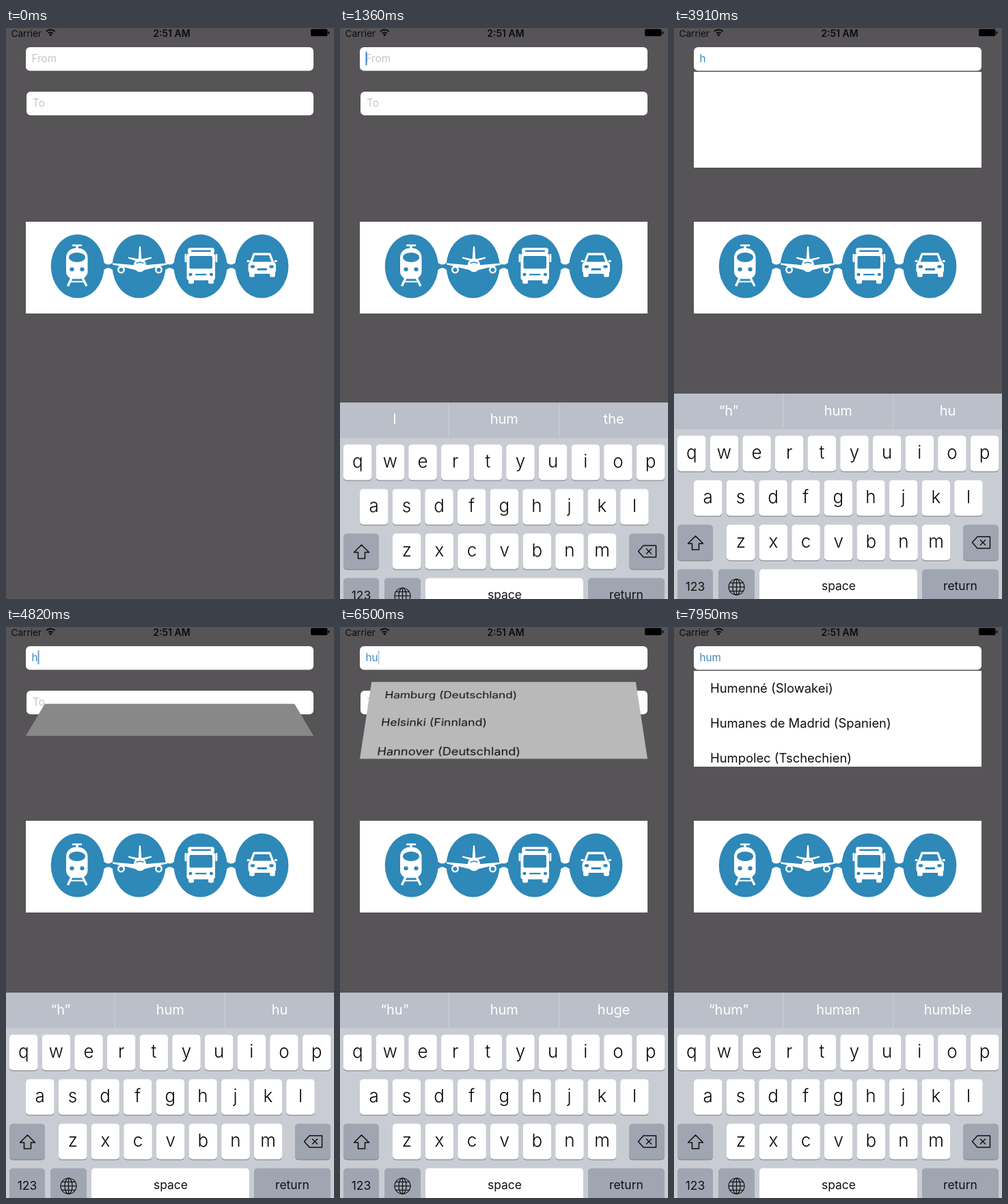
An HTML page with a canvas for the animation above (8 s loop, 480 by 834 pixels).

```html
<!DOCTYPE html>
<html lang="en">
<head>
<meta charset="utf-8">
<title>City search</title>
<style>
  html, body { margin: 0; width: 100%; height: 100%; overflow: hidden; background: #565457; }
  canvas { position: absolute; left: 0; top: 0; }
  #space { position: absolute; left: 29px; top: 64px; width: 421px; height: 140px; perspective: 860px; }
  #panel { position: relative; width: 100%; height: 100%; overflow: hidden; background: #fff; }
  #panel div { height: 51px; padding-left: 24px; white-space: nowrap;
    font: 18.4px/51px Inter, "Open Sans", sans-serif; color: #111; }
  #panel #shade { position: absolute; inset: 0; height: auto; padding: 0; background: #000; }
</style>
</head>
<body>
<canvas id="stage" width="480" height="834"></canvas>
<div id="space"><div id="panel"><div></div><div></div><div></div><div id="shade"></div></div></div>
<script>
const LOOP = 8000, FOCUS = 1090, FLIP_MS = 500;
const KEYS_Y = 534, KEYS_H = 300;
const FONT = 'Inter, "Open Sans", sans-serif';
const BLUE = '#2e88b8', WHITE = '#fff';

const typing = [
  { at: FOCUS, text: '', hints: ['I', 'hum', 'the'] },
  { at: 2300, text: 'h', hints: ['“h”', 'hum', 'hu'] },
  { at: 5530, text: 'hu', hints: ['“hu”', 'hum', 'huge'] },
  { at: 7000, text: 'hum', hints: ['“hum”', 'human', 'humble'] }
];
const results = [
  { at: 2300, rows: ['', '', ''] },
  { at: 4609, rows: ['Hamburg (Deutschland)', 'Helsinki (Finnland)', 'Hannover (Deutschland)'] },
  { at: 6363, rows: ['Huddersfield (Großbritannien)', 'Huelva (Spanien)', 'Huddinge (Schweden)'] },
  { at: 7218, rows: ['Humenné (Slowakei)', 'Humanes de Madrid (Spanien)', 'Humpolec (Tschechien)'] }
];

const stage = document.getElementById('stage').getContext('2d');
const space = document.getElementById('space');
const panel = document.getElementById('panel');
const shade = document.getElementById('shade');

function layer(w, h) {
  const c = document.createElement('canvas');
  c.width = w;
  c.height = h;
  return c.getContext('2d');
}

function label(g, text, x, y, size, color, align = 'left', weight = 400) {
  g.font = `${weight} ${size}px ${FONT}`;
  g.fillStyle = color;
  g.textAlign = align;
  g.fillText(text, x, y);
}

function box(g, x, y, w, h, r, color) {
  g.fillStyle = color;
  g.beginPath();
  g.roundRect(x, y, w, h, r);
  g.fill();
}

function oval(g, x, y, rx, ry, color) {
  g.fillStyle = color;
  g.beginPath();
  g.ellipse(x, y, rx, ry, 0, 0, Math.PI * 2);
  g.fill();
}

function trace(g, pts) {
  g.beginPath();
  pts.forEach(([x, y]) => g.lineTo(x, y));
}

function poly(g, pts, color) {
  trace(g, pts);
  g.fillStyle = color;
  g.fill();
}

function line(g, pts, width, color, closed) {
  trace(g, pts);
  if (closed) g.closePath();
  g.lineWidth = width;
  g.strokeStyle = color;
  g.stroke();
}

function statusBar(g) {
  label(g, 'Carrier', 7.5, 12.5, 13.6, '#0c0c0c');
  label(g, '2:51 AM', 242.5, 12.8, 14, '#0c0c0c', 'center', 600);
  g.strokeStyle = '#0c0c0c';
  g.lineWidth = 2;
  for (const r of [4.6, 8.6]) {
    g.beginPath();
    g.arc(65.2, 11, r, -Math.PI * 0.76, -Math.PI * 0.24);
    g.stroke();
  }
  oval(g, 65.2, 10, 1.8, 1.8, '#0c0c0c');
  box(g, 446, 1.5, 24.5, 10.5, 2, '#000');
  box(g, 471.5, 5, 1.8, 4, 1, '#000');
}

function train(g) {
  line(g, [[97, 317.5], [111, 317.5]], 2.6, WHITE);
  line(g, [[104, 318], [104, 324]], 3.4, WHITE);
  box(g, 88, 321.5, 31.5, 45, [14, 14, 11, 11], WHITE);
  oval(g, 104, 335, 12, 7, BLUE);
  oval(g, 96.5, 352.5, 3.2, 3, BLUE);
  oval(g, 111.5, 352.5, 3.2, 3, BLUE);
  line(g, [[96, 365], [90.5, 377]], 3.4, WHITE);
  line(g, [[112, 365], [118, 377]], 3.4, WHITE);
  line(g, [[94, 370.5], [114, 370.5]], 2, WHITE);
}

function plane(g) {
  poly(g, [[195, 319], [197, 319], [198.5, 340], [193.5, 340]], WHITE);
  poly(g, [[179, 334.5], [196, 338], [213, 334.5], [213, 336.5], [196, 342], [179, 336.5]], WHITE);
  poly(g, [[156, 343.5], [196, 347], [236, 343.5], [236, 345.5], [200, 354], [192, 354], [156, 345.5]], WHITE);
  for (const x of [168.5, 223.5]) {
    oval(g, x, 353, 5.5, 5.5, WHITE);
    oval(g, x, 353.3, 3, 3, BLUE);
  }
  oval(g, 196, 346.5, 9, 9.8, WHITE);
  line(g, [[190.5, 343.5], [196, 342], [201.5, 343.5]], 1.6, BLUE);
}

function bus(g) {
  box(g, 266, 321, 39, 9, 4, WHITE);
  box(g, 271, 324.5, 29, 2.5, 1, BLUE);
  box(g, 264.5, 329, 41.5, 39.5, 4, WHITE);
  box(g, 268.5, 333, 33.5, 18.5, 2, BLUE);
  for (const x of [261.5, 306.5]) box(g, x, 330, 2.8, 12, 1, WHITE);
  for (const x of [270, 300.5]) oval(g, x, 360, 2.6, 2.2, BLUE);
  box(g, 277, 359, 16.5, 2.2, 1, BLUE);
  for (const x of [267, 296]) box(g, x, 366, 8, 7.5, 2, WHITE);
}

function car(g) {
  poly(g, [[362, 328.5], [387, 328.5], [393, 344], [356, 344]], WHITE);
  poly(g, [[364, 332], [385, 332], [388.5, 342], [360.5, 342]], BLUE);
  box(g, 354.5, 341.5, 40.5, 17.5, 5, WHITE);
  for (const x of [352.5, 392.5]) box(g, x, 339, 4.5, 3, 1.5, WHITE);
  for (const x of [361, 388.5]) oval(g, x, 348.5, 3.2, 2.3, BLUE);
  box(g, 367.5, 351, 14.5, 3, 1, BLUE);
  for (const x of [356, 386]) box(g, x, 356, 7.8, 7.8, 2, WHITE);
}

function picture() {
  const g = layer(480, 834);
  for (let i = 0; i < 4; i++) {
    const x = 104.7 + i * 89.9;
    oval(g, x, 348, 39, 46.5, BLUE);
    if (i < 3) {
      g.beginPath();
      g.moveTo(x + 37, 341);
      g.quadraticCurveTo(x + 45, 350, x + 53, 341);
      g.lineTo(x + 53, 355);
      g.quadraticCurveTo(x + 45, 346, x + 37, 355);
      g.fill();
    }
  }
  [train, plane, bus, car].forEach(draw => draw(g));
  return g.canvas;
}

function makeScene() {
  const g = layer(480, 834);
  g.fillStyle = '#565457';
  g.fillRect(0, 0, 480, 834);
  statusBar(g);
  box(g, 29, 28, 421, 34.5, 6, WHITE);
  box(g, 30, 93, 420, 34.5, 6, WHITE);
  label(g, 'To', 39, 115.3, 15.3, '#c5c5ca');
  g.fillStyle = WHITE;
  g.fillRect(29, 283, 421, 134);
  g.filter = 'blur(0.7px)';
  g.drawImage(picture(), 0, 0);
  return g.canvas;
}

function key(g, x, y, w, color = WHITE) {
  box(g, x, y + 1.3, w, 52, 5, '#888b91');
  box(g, x, y, w, 52, 5, color);
}

function letters(g, text, x, y) {
  [...text].forEach((ch, i) => {
    const kx = x + i * 47.65;
    key(g, kx, y, 41.5);
    label(g, ch, kx + 20.75, y + 33, 26, '#080808', 'center', 300);
  });
}

function globe(g, x, y) {
  g.strokeStyle = '#111';
  g.lineWidth = 1.2;
  for (const rx of [11.5, 5.5]) {
    g.beginPath();
    g.ellipse(x, y, rx, 11.5, 0, 0, Math.PI * 2);
    g.stroke();
  }
  line(g, [[x, y - 11.5], [x, y + 11.5]], 1.2, '#111');
  for (const [dy, half] of [[-6, 9.8], [0, 11.5], [6, 9.8]]) {
    line(g, [[x - half, y + dy], [x + half, y + dy]], 1.2, '#111');
  }
}

function makeKeyboard() {
  const g = layer(480, KEYS_H);
  const gray = '#a0a6b1';
  g.fillStyle = '#c9ccd3';
  g.fillRect(0, 0, 480, KEYS_H);
  g.fillStyle = '#babfc9';
  g.fillRect(0, 0, 480, 52);
  g.fillStyle = '#cdd1d8';
  g.fillRect(159, 0, 1, 52);
  g.fillRect(320, 0, 1, 52);
  letters(g, 'qwertyuiop', 5, 61.5);
  letters(g, 'asdfghjkl', 29, 126.5);
  letters(g, 'zxcvbnm', 77, 191.5);
  key(g, 5, 191.5, 52, gray);
  key(g, 423, 191.5, 52, gray);
  g.lineJoin = 'round';
  line(g, [[31.5, 208], [42.5, 219], [36.5, 219], [36.5, 228], [26.5, 228], [26.5, 219], [20.5, 219]], 1.6, '#111', true);
  line(g, [[436.5, 217.5], [444, 209], [462.5, 209], [462.5, 226], [444, 226]], 1.5, '#111', true);
  line(g, [[448, 213.5], [456, 221.5]], 1.5, '#111');
  line(g, [[456, 213.5], [448, 221.5]], 1.5, '#111');
  key(g, 5, 256.5, 52, gray);
  key(g, 65, 256.5, 53, gray);
  key(g, 125, 256.5, 231);
  key(g, 363, 256.5, 112, gray);
  label(g, '123', 31, 288, 17.5, '#111', 'center');
  label(g, 'space', 241, 286.5, 17.5, '#111', 'center');
  label(g, 'return', 419, 286.5, 17.5, '#111', 'center');
  globe(g, 91.5, 282.5);
  return g.canvas;
}

const scene = makeScene(), keyboard = makeKeyboard();
const latest = (list, t) => list.findLastIndex(e => t >= e.at);

function keyboardY(t) {
  const u = (t - FOCUS) * 0.01826;
  const rest = KEYS_H * (1 + u) * Math.exp(-u);
  return KEYS_Y + (rest < 0.4 ? 0 : rest);
}

// Solid, short fade out, dark, short fade in; restarts with each keystroke.
function caretAlpha(ms) {
  const p = ms % 1000;
  if (p < 500) return 1;
  if (p < 600) return (600 - p) / 100;
  return Math.max(0, (p - 950) / 50);
}

function drawField(t, entry) {
  const text = entry ? entry.text : '';
  if (text) label(stage, text, 37.5, 50.3, 15.2, '#3e88b4');
  else label(stage, 'From', 37.5, 50.3, 15.3, '#c5c5ca');
  if (!entry) return;
  const x = text ? 37.5 + stage.measureText(text).width : 37.5;
  stage.globalAlpha = caretAlpha(t - entry.at);
  stage.fillStyle = '#3e86c4';
  stage.fillRect(x, 34.5, 2, 20);
  stage.globalAlpha = 1;
}

function drawPanel(t) {
  const i = latest(results, t);
  space.hidden = i < 0;
  if (i < 0) return;
  const p = i ? Math.min(1, (t - results[i].at) / FLIP_MS) : 1;
  const turn = p * p * (3 - 2 * p) * Math.PI;
  const old = turn < Math.PI / 2;
  const angle = old ? turn : turn - Math.PI;
  const depth = Math.abs(Math.sin(angle));
  results[old ? i - 1 : i].rows.forEach((row, n) => {
    const el = panel.children[n];
    if (el.textContent !== row) el.textContent = row;
  });
  panel.style.transform = p < 1 ? `translateZ(${-70 * depth}px) rotateX(${angle}rad)` : 'none';
  shade.style.opacity = p < 1 ? depth / 2 : 0;
}

function draw(t) {
  const entry = typing[latest(typing, t)];
  stage.drawImage(scene, 0, 0);
  drawField(t, entry);
  if (entry) {
    const y = keyboardY(t);
    stage.drawImage(keyboard, 0, y);
    entry.hints.forEach((hint, i) => label(stage, hint, 80 + i * 160.3, y + 31.5, 20, WHITE, 'center'));
  }
  drawPanel(t);
}

let start;
function tick(now) {
  start ??= now;
  draw((now - start) % LOOP);
  requestAnimationFrame(tick);
}
requestAnimationFrame(tick);
</script>
</body>
</html>
```
